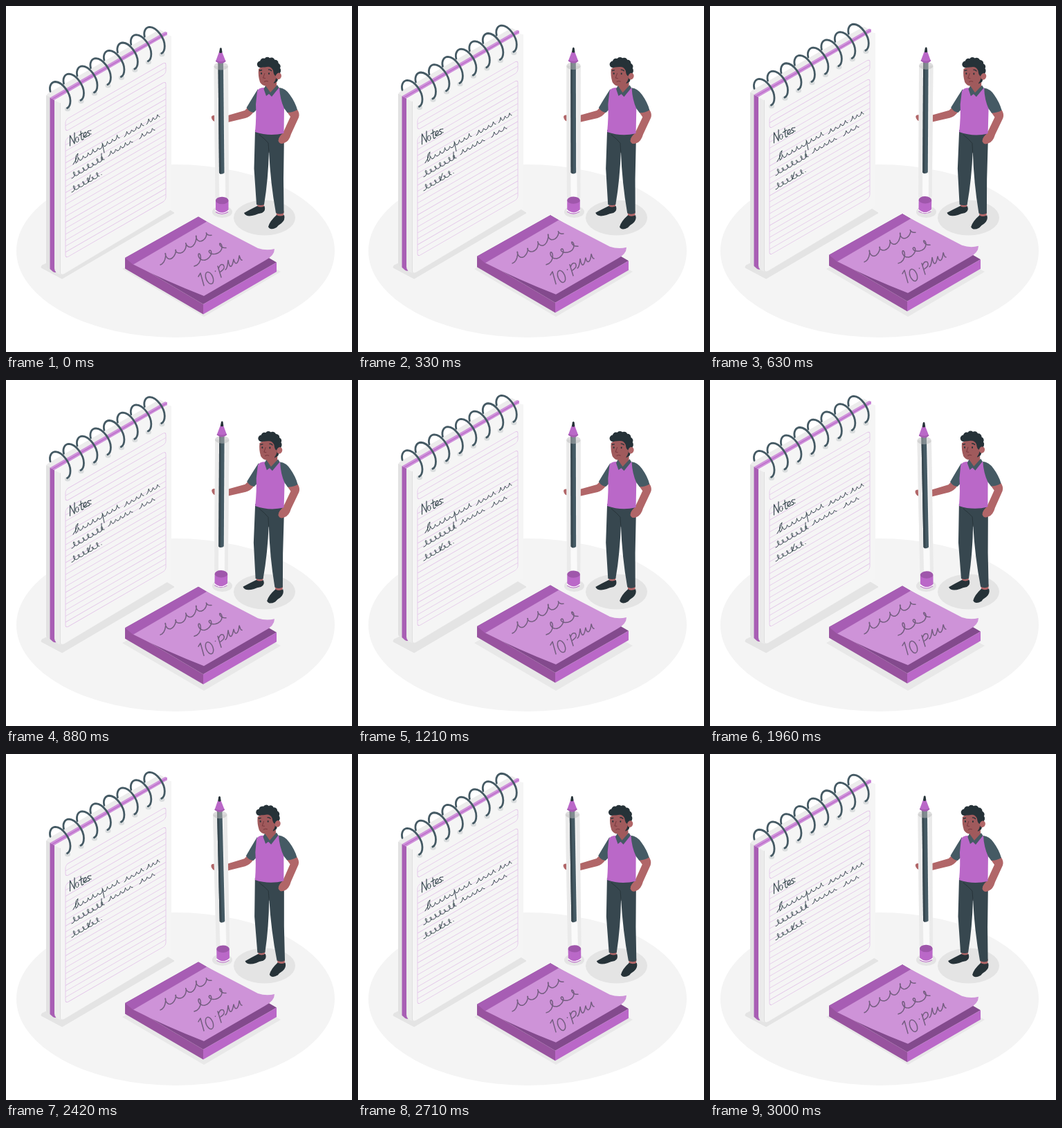
Write an HTML page that moves like this. It is 500 by 500 pixels and loops after 3.04 s.

```html
<!DOCTYPE html>
<html lang="en">
<head>
<meta charset="utf-8">
<title>Notes</title>
<style>
  html, body { margin: 0; width: 100%; height: 100%; overflow: hidden; background: #fff; }
  svg { display: block; width: 100vw; height: 100vh; }
  .line { fill: none; stroke: #e2c2e8; stroke-width: .8; }
  .ink { fill: none; stroke: #37474f; stroke-linecap: round; stroke-linejoin: round; }
  .memo .ink { stroke: #745d80; stroke-width: 1.5; }
  .ring { fill: none; stroke: #455a64; stroke-width: 2.8; stroke-linecap: round; }
  .dark { fill: #263238; }
  .slate { fill: #455a64; }
  .pants { fill: #37474f; }
  .violet { fill: #ba68c8; }
  .skin { fill: #b16668; }
  .face { fill: #a05a5c; }
</style>
</head>
<body>
<svg viewBox="0 0 500 500">
  <!-- floor and shadows -->
  <ellipse cx="245" cy="354" rx="230" ry="125" fill="#f4f4f4"/>
  <g fill="#e4e4e4">
    <path d="M52 375L230 291L243 299L81 394L51 378Z" stroke="#e4e4e4" stroke-linejoin="round"/>
    <path d="M168 380L278 318L397 384L286 449Z" fill="#e8e8e8"/>
    <ellipse cx="373.500" cy="306" rx="44.500" ry="25.500"/>
    <ellipse cx="312.500" cy="297.500" rx="14.500" ry="8.500"/>
  </g>

  <g class="float">
    <!-- notepad -->
    <path d="M58 131Q58 128 61 126L222 34L232 39L64 136V380Q58 379 58 375Z" fill="#ececec"/>
    <path d="M58 129L64 132V380Q58 379 58 375Z" fill="#e2e2e2"/>
    <path d="M63.500 132.500L230 37L233 38V42L70 136Z" fill="#cf92da"/>
    <path d="M66.500 134.500L232 39.500" stroke="#ba68c8" stroke-width="1.200"/>
    <path d="M63.500 132.500L70 136V379L75 384Q71 386 68 384L63.500 380Z" fill="#a85eb4"/>
    <path d="M70 136L79 140V388Q70 386 70 379Z" fill="#ebebeb"/>
    <path d="M70 136L229 44Q233 41 239 43.500V289Q239 294 236 296L84 387Q79 389 79 385V141Z" fill="#f5f5f5"/>
    <path d="M78.500 140V387" stroke="#dedede" stroke-width=".8"/>
    <g id="rules" transform="matrix(1 -.577 0 1 0 0)"></g>
    <g class="ink" aria-label="Notes:">
      <path stroke-width="1.200" d="M92.500 202V187L99 199V183M108 181L109 192Q109.500 195 112 192M105.500 187L111 183.500M112 189.500L116 186Q116 181 113.500 183C110.500 187 112 193 117 188M121 180Q117 180.500 118 183.500C122 183 122 187 118 188M122.800 184.500v.6M122.500 179.500v.6"/>
      <ellipse cx="102.700" cy="193" rx="2.200" ry="3.700"/>
      <path d="M97 229Q104 218 104 213Q99 217 101 226M139 198L142 212M138 213V223M122 244L119 255M138 243.500v.3"/>
    </g>
    <g id="note"></g>
    <g id="rings"></g>

    <!-- sticky notes -->
    <path d="M172 364L278 304.500L391 370.500L285 431Z" fill="#834a8d"/>
    <path d="M172 364L285 431V445.500L172 379.500Z" fill="#98539f"/>
    <path d="M285 431L391 370.500V384L285 445.500Z" class="violet"/>
    <path d="M172 364L278 304.500L290 311.500L184 374Z" fill="#a75db4"/>
    <path d="M184 373.500L290 311.500L364 350Q376 354 388 351Q388 361 374 368L286 419Q232 398 184 373.500Z" fill="#ce93d8"/>
    <g class="memo">
      <g id="memo"></g>
      <g class="ink">
        <path d="M278 391L281 386L286 404M302.500 383v.4M306 376L311 392M307 380Q309 372 314 374Q318 379 310 384"/>
        <ellipse cx="294" cy="393" rx="5" ry="9" transform="rotate(-22 294 393)"/>
      </g>
    </g>
  </g>

  <g class="sway">
    <!-- holding hand, then the pen over it -->
    <path class="skin" d="M297 162Q296 158 301 158L310 161L321 158L345 151L350 146L358 153Q353 160 346 162L321 168L304 167Q299 168 297 162Z"/>
    <path d="M300.500 87H321L322 287H302.500Z" fill="#f1f1f1"/>
    <path d="M300.500 87h5l2.500 190h-5.500ZM316 87h5l1 190h-4.500Z" fill="#eaeaea"/>
    <path d="M308 243h8.500l.5 36h-8.500Z" fill="#fafafa"/>
    <path class="slate" d="M306.500 82H314L315.500 241Q312 244.500 308 241Z"/>
    <path class="pants" d="M306.500 82h2.500l2 161Q309 243 308 241Z"/>
    <ellipse cx="310.700" cy="87" rx="10.200" ry="5.500" fill="#bbb" opacity=".5"/>
    <path class="violet" d="M307.700 67H312.500L317.500 80Q311 86 303 80Z"/>
    <path d="M303.500 78.500Q311 82 317 78.500L317.500 80Q311 86 303 80Z" fill="#a55bb1"/>
    <path class="dark" d="M308 67L309 61.500Q310.500 59 311.700 61.500L312.500 67Q310 69 308 67Z"/>
    <path class="violet" d="M303 281H321.500V295Q312 303 303 295Z"/>
    <ellipse cx="312.200" cy="281" rx="9.300" ry="5.200" fill="#9f57ab"/>
    <path d="M302.500 295Q312 304 322 295" fill="none" stroke="#fff" stroke-width="1.300"/>
    <path d="M303 297.500Q312 303.500 321 297.500" fill="none" stroke="#ba68c8"/>

    <!-- legs -->
    <path class="skin" d="M363 284h10l-.5 8h-9ZM390.500 296h11l-.5 9h-10Z"/>
    <path class="dark" d="M344 299Q353 294 363 289Q368 292 373.500 289Q376 296 370 299Q364 300 360 302Q347 306 344 299Z"/>
    <path class="dark" d="M379 319Q381 311 391 302Q396 305 402 302Q404 309 398 314Q393 317 391 320Q382 325 379 319Z"/>
    <path class="pants" d="M360 179L402 181L401 250L401.500 299Q396 302 390 299Q382 255 380 209Q379 250 373 287Q368 289 362 287L358.500 235Z"/>
    <path d="M366 186Q374 192 379 198L380 212" fill="none" stroke="#263238" stroke-width=".9"/>

    <!-- torso and arms -->
    <path class="slate" d="M364 120Q357 131 347.500 147Q351 153 358 154L366 146Z"/>
    <path class="skin" d="M406 153L420.500 149Q425 155 423 161L412 185Q409 196 402 198Q396 200 393.500 195Q394 189 400 184L411 160Z"/>
    <path class="violet" d="M363 123Q365 118 373 118H395L402 145L401.500 184Q380 189 360 182Q362 160 361 142Z"/>
    <path class="slate" d="M395 118Q404 119 410 128Q418 139 421 150Q414 154 406.500 154L402 148Q396 135 395 118Z"/>
    <path class="skin" d="M394 192Q397 185 403 183L408 188Q405 198 398 199Q393 198 394 192Z"/>
    <path class="face" d="M375 109L391 104V117L382 126L375 118Z"/>
    <path class="slate" d="M375 115L382 125L392 114L394.500 118L384 131L380 127L376 130L372.500 120Z"/>

    <!-- head -->
    <path class="dark" d="M387 90L397 94L392 109L387 112Z"/>
    <path class="face" d="M365 91Q364 101 367 110Q371 117 379 115Q388 113 390 105L391 88Q378 81 365 91Z"/>
    <g class="dark">
      <g id="curls"></g>
      <path d="M363 85L368 79H387L394 89L391 101Q387 102 386 93Q383 87 377 88Q370 89 366 88Z"/>
      <ellipse cx="369" cy="97.500" rx="1" ry="1.400"/><ellipse cx="380" cy="97.700" rx="1" ry="1.400"/>
    </g>
    <ellipse class="skin" cx="394" cy="101.300" rx="4" ry="4.800" transform="rotate(18 394 101)"/>
    <path d="M366 93.500L370 92.500M379 92Q382 91.500 384 94" fill="none" stroke="#263238" stroke-width="1.300"/>
    <path d="M374 97L371.500 104L375 104.500M373 109.500Q376 107.500 379 109" fill="none" stroke="#74353b" stroke-width=".9"/>
  </g>
</svg>
<script>
  const $ = s => document.querySelector(s);
  const repeat = (n, f) => Array.from({ length: n }, (_, i) => f(i)).join('');
  const SLOPE = .577;

  // Handwriting: a rising wave of n strokes; a large lean closes them into loops.
  function scrawl(x, y, width, n, height, lean) {
    const steps = n * 12;
    const d = repeat(steps + 1, i => {
      const u = i / steps, a = u * n * 2 * Math.PI;
      const h = height * (1 + .25 * Math.sin(a / 2.6)) * (1 - Math.cos(a)) / 2;
      const px = x + width * u + lean * Math.sin(a), py = y - SLOPE * width * u - h;
      return `${i ? 'L' : 'M'}${px.toFixed(1)} ${py.toFixed(1)}`;
    });
    return `<path class="ink" d="${d}"/>`;
  }

  // Ruled panel in skewed page coordinates.
  const panel = (y, rows, gap) =>
    `<rect class="line" x="86" y="${y}" width="145" height="${rows * gap}" rx="4"/>` +
    repeat(rows - 1, i => `<path class="line" d="M86 ${y + (i + 1) * gap}h145"/>`);

  $('#rules').innerHTML = panel(214, 2, 8.5) + panel(242, 20, 8.6);

  $('#note').innerHTML =
    scrawl(101, 227, 63, 9, 5, 1) + scrawl(171, 189, 28, 4, 4.5, .8) + scrawl(203, 171, 19, 3, 5, .8) +
    scrawl(95, 249, 47, 7, 6, 2.5) + scrawl(148, 217, 35, 5, 4.5, .8) + scrawl(193, 192, 22, 3, 4.5, .8) +
    scrawl(95, 269, 40, 6, 6, 2.5);

  $('#memo').innerHTML =
    scrawl(223, 374, 74, 5, 10, 3) + scrawl(272, 376, 46, 3, 11, 5) + scrawl(317, 381, 24, 3, 9, 1);

  const ringAt = i => `transform="translate(${i * 19.47} ${i * -11.3})"`;
  $('#rings').innerHTML =
    repeat(8, i => `<ellipse ${ringAt(i)} cx="89" cy="149" rx="4" ry="3.2" fill="#d9dcdd"/>`) +
    repeat(8, i => `<path ${ringAt(i)} class="ring" d="M64 123.500C62 115 66 109.500 71.500 109.500C82 110 93 126 93 137C93 143 91.500 146 88.500 147.500"/>`);

  $('#curls').innerHTML = repeat(7, i => {
    const a = Math.PI * (1.18 + i * .145);
    return `<circle cx="${379 + 13.5 * Math.cos(a)}" cy="${91 + 12.5 * Math.sin(a)}" r="4.8"/>`;
  });

  const LOOP = 3040;
  // Triangle wave: 0 at the start, 1 halfway, 0 at the end.
  const tri = t => 1 - Math.abs(1 - 2 * (t % 1));
  const start = performance.now();

  function draw() {
    const t = (performance.now() - start) / LOOP;
    const lift = 10 * tri(t);
    const angle = 2 * tri(t + .25) - 1;
    $('.float').setAttribute('transform', `translate(0 ${-lift})`);
    $('.sway').setAttribute('transform', `rotate(${angle} 361 191)`);
    requestAnimationFrame(draw);
  }
  draw();
</script>
</body>
</html>
```
